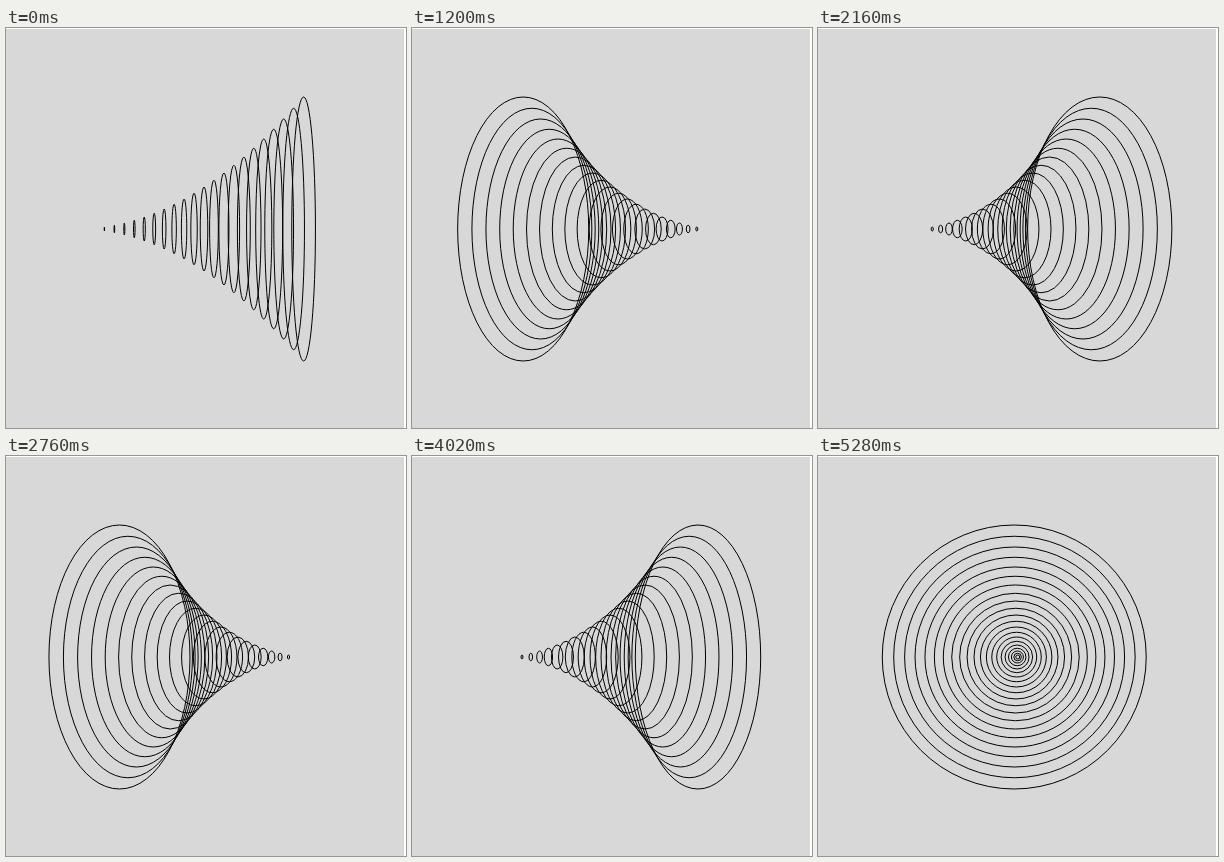
Write an HTML page with a canvas that moves like this. It is 400 by 400 pixels and loops after 5.34 s.

```html
<!DOCTYPE html>
<html lang="en">
<head>
<meta charset="utf-8">
<title>Turning cone of rings</title>
<style>
  html, body { margin: 0; width: 100%; height: 100%; overflow: hidden; background: #fff; }
  canvas { display: block; }
</style>
</head>
<body>
<canvas id="stage" width="400" height="400"></canvas>
<script>
const ctx = document.getElementById('stage').getContext('2d');
const STEP = 60, STEPS = 89, RINGS = 21, GAP = 10;
const START = 1.481;   // opening pose, almost side-on
const PHASE = 1.232;   // phase of the steady turn that follows
const TURN = 0.2;      // radians per step

function draw(step) {
  const angle = step ? PHASE + TURN * step : START;
  const sin = Math.sin(angle), squash = Math.abs(Math.cos(angle));

  ctx.setTransform(1, 0, 0, 1, 0, 0);
  ctx.fillStyle = '#fff';
  ctx.fillRect(0, 0, 400, 400);

  // The scene sits slightly off the stage, leaving thin white edges.
  ctx.translate(-2, 1);
  ctx.fillStyle = '#d8d8d8';
  ctx.fillRect(0, 0, 400, 400);
  ctx.strokeStyle = '#000';
  ctx.lineWidth = 1;

  for (let i = 0; i < RINGS; i++) {
    const radius = (i + 2) * (i + 4) / 4;
    const x = 200 + (i - 10) * GAP * sin;
    ctx.beginPath();
    ctx.ellipse(x, 200, radius * squash, radius, 0, 0, Math.PI * 2);
    ctx.stroke();
  }
}

const begin = performance.now();
function tick() {
  const elapsed = performance.now() - begin;
  draw(Math.floor(elapsed / STEP) % STEPS);
  requestAnimationFrame(tick);
}
tick();
</script>
</body>
</html>
```
